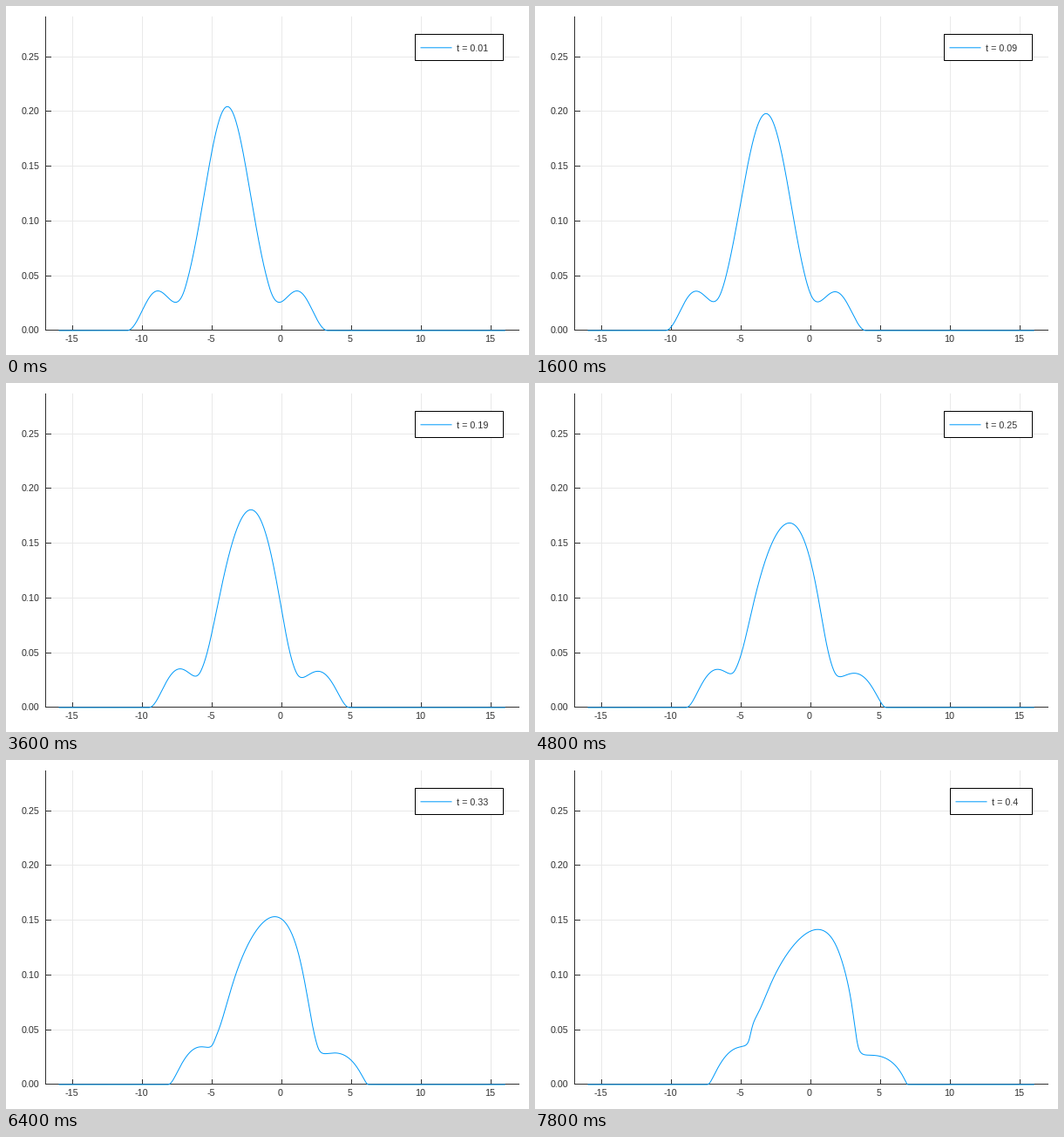
These frames come from a looping animation (600 px wide and 400 px high, 8 s). A matplotlib script:

```python
import numpy as np
import matplotlib.pyplot as plt
from matplotlib.animation import FuncAnimation
from matplotlib.patches import Rectangle

W, H, DPI = 600, 400, 100
FRAMES, STEP = 40, 200
LEFT, RIGHT, TOP, BASE = 45, 588, 12, 371.75
X_SCALE, Y_SCALE, X_ZERO = 15.98, 1254, 316.6
BLUE, DARK, GRID = "#009afa", "#303030", "#e9e9e9"

# The density is a fluid lump: it drifts right while pressure spreads it.
CENTER, SPEED = -4, 8
PRESSURE, VISCOSITY = 112, 0.06
SUBSTEPS = 20
DT = 0.01 / SUBSTEPS


def initial_density(d):
    """Gaussian core with a cosine-squared bump on either side."""
    core = 0.2048 * np.exp(-d**2 / (2 * 1.664**2))
    side = np.clip((np.abs(d) - 5.1) / 4.2, -0.5, 0.5)
    return core + 0.0342 * np.cos(np.pi * side) ** 2


def simulate():
    """Follow the fluid cells and return one (x, density) pair per frame."""
    d = np.linspace(-8, 8, 401)
    dq = d[1] - d[0]
    mass = initial_density((d[1:] + d[:-1]) / 2) * dq
    drift = 5.5 + 2 * np.cos(2 * np.pi * d / 6.4)
    x = CENTER + d
    u = np.full(d.size, float(SPEED))
    states = []
    for _ in range(FRAMES):
        for _ in range(SUBSTEPS):
            rho = mass / np.diff(x)
            force = drift.copy()
            force[1:-1] -= 2 * PRESSURE * np.diff(rho) / (x[2:] - x[:-2])
            force[1:-1] += VISCOSITY * np.diff(u, 2) / dq**2
            u = u + force * DT
            x = x + u * DT
        states.append(((x[1:] + x[:-1]) / 2, mass / np.diff(x)))
    return states


def px(x):
    return X_ZERO + X_SCALE * x


def py(y):
    return BASE - Y_SCALE * y


plt.rcParams["font.family"] = "Liberation Sans"
FONT = 10.8 * 72 / DPI
PIXEL = 72 / DPI

fig = plt.figure(figsize=(W / DPI, H / DPI), dpi=DPI, facecolor="white")
ax = fig.add_axes([0, 0, 1, 1])
ax.set_xlim(0, W)
ax.set_ylim(H, 0)
ax.axis("off")


def line(xs, ys, color=DARK, z=2):
    return ax.plot(xs, ys, color=color, lw=PIXEL, zorder=z)[0]


def label(x, y, text, ha, z=3):
    return ax.text(x, y, text, ha=ha, va="baseline", fontsize=FONT,
                   color=DARK, zorder=z)


floor = int(BASE)
for v in range(-15, 16, 5):
    col = int(px(v))
    line([col, col], [TOP, floor], GRID, 1)
    line([col, col], [floor, floor - 5])
    label(col - 1, 385, str(v), "center")
for i in range(6):
    v = i * 0.05
    row = int(py(v))
    if i:
        line([LEFT, RIGHT], [row, row], GRID, 1)
    line([LEFT, LEFT + 6], [row, row])
    label(38.5, row + 4, f"{v:.2f}", "right")
line([LEFT, LEFT], [TOP, floor])
line([LEFT, RIGHT], [floor, floor])

curve = line([], [], BLUE, 3)
curve.set_snap(False)
box = ax.add_patch(Rectangle((469, 32), 101, 30, facecolor="white",
                             edgecolor="black", lw=PIXEL, zorder=4))
sample = line([], [], BLUE, 5)
sample.set_snap(False)
caption = label(517, 52, "", "left", 5)

states = simulate()


def update(frame):
    x, rho = states[frame]
    x = np.concatenate([[-16], x, [16]])
    rho = np.concatenate([[0], rho, [0]])
    curve.set_data(px(x), py(rho) + 0.25)
    text = f"{(frame + 1) / 100:g}"
    left = 469 if len(text) == 4 else 476
    box.set_x(left)
    box.set_width(570 - left)
    sample.set_data([left + 7, left + 42], [47.8, 47.8])
    caption.set_x(left + 48)
    caption.set_text(f"t = {text}")
    return curve, box, sample, caption


anim = FuncAnimation(fig, update, frames=FRAMES, interval=STEP,
                     repeat=True, repeat_delay=0, blit=False)
plt.show()
```
